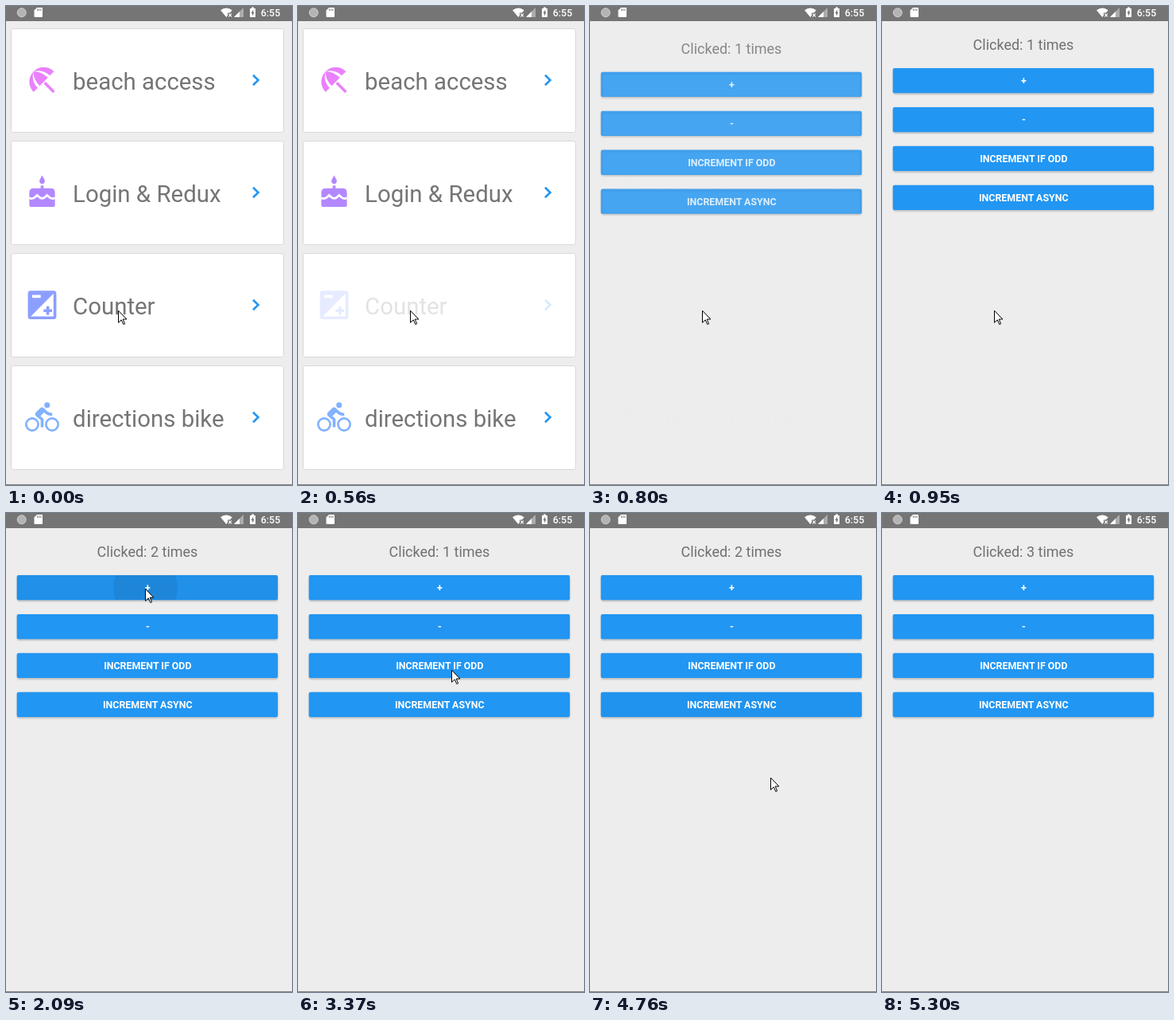
Write an HTML page that moves like this. It is 360x601 px and loops after 5.45 s.

```html
<!DOCTYPE html>
<html lang="en">
<head>
<meta charset="utf-8">
<title>Counter demo</title>
<style>
  html, body { margin: 0; height: 100%; overflow: hidden; background: #ededed; }
  svg { font-family: Roboto, sans-serif; }
  #stage { display: block; width: 100%; height: 100%; }
  .label { font-size: 29.4px; fill: #757575; }
  .line { fill: none; stroke: currentColor; stroke-width: 2; }
  .caption { font-size: 12.4px; font-weight: 700; fill: #fff; text-anchor: middle; }
  #count { font-size: 18px; fill: #707070; text-anchor: middle; }
  .shadow { fill: none; stroke: #000; stroke-opacity: .3; stroke-width: 2; filter: blur(1px); }
</style>
</head>
<body>
<svg id="stage" viewBox="0 0 360 601">
  <rect width="360" height="601" fill="#ededed"/>
  <g id="cards"></g>
  <g id="screen">
    <rect id="backdrop" y="19" width="360" height="582" fill="#ededed"/>
    <text id="count" class="fade" x="178" y="55"></text>
    <g id="buttons"></g>
    <svg id="press" x="14" width="328" height="31">
      <rect id="dim" width="328" height="31" rx="2"/>
      <circle id="ripple" cy="16" fill-opacity=".07"/>
    </svg>
    <g id="captions"></g>
  </g>
  <rect y="600" width="360" height="1" fill="#858585"/>

  <g fill="#fff">
    <rect width="360" height="19" fill="#757575"/>
    <circle cx="19.7" cy="8.3" r="5.5" fill="#b4b4b4" stroke="#d2d2d2"/>
    <path d="M39 2H45q1 0 1 1V13q0 1-1 1H36.5q-1 0-1-1V5.5Z"/>
    <path d="M39.5 3.5v2.5m2.2-2.5v2.5m2.2-2.5v2.5" stroke="#757575"/>
    <path d="M270 5.3Q277.3-.3 284.7 5.3L282 8.5H279V12L277.3 14Z"/>
    <path d="M280.3 9.7l3.6 3.6m0-3.6l-3.6 3.6" stroke="#fff" stroke-width="1.2"/>
    <path d="M287 14L299 2V14Z" opacity=".4"/>
    <path d="M287 14L294 7V14Z"/>
    <path d="M309 1.5h3V3h2v11h-7V3h2Z"/>
    <path d="M311.2 4.5L308.4 9.2H310V12.5L312.7 7.8H311.2Z" fill="#757575"/>
    <text x="320.8" y="13" font-size="12.4" font-weight="500">6:55</text>
  </g>
  <path id="cursor" d="M.5 1.2V16.3L4.2 12.8 6.8 18.5 8.6 17.7 6.2 12H10.9Z" fill="#fff" stroke="#000"/>
</svg>
<script>
const LOOP = 5450;
const $ = id => document.getElementById(id);
const set = (id, attrs) => {
  for (const name in attrs) $(id).setAttribute(name, attrs[name]);
};
const times = (n, make) => Array.from({ length: n }, (_, i) => make(i)).join('');

// Icons are drawn on a 24-unit grid.
const CARDS = [
  { label: 'beach access', color: '#ea80fc', icon: `
    <path d="M17.4 8.8l2.9-2.9c-4-4-10.4-4-14.3 0 3.9-1.3 8.3-.2 11.4 2.9zM6 6c-4 4-4 10.3 0 14.3l2.9-2.9C5.7 14.3 4.7 10 6 6zM6 6c-.4 3 1.2 6.9 4.3 10l5.7-5.7C12.9 7.2 9 5.6 6 6z"/>
    <path class="line" d="M13.8 13.8l6.5 6.5"/>` },
  { label: 'Login &amp; Redux', color: '#b388ff', icon: `
    <path d="M12 0l-1.7 3q-.8 2.4 1.7 3 2.5-.6 1.7-3zM11 7h2v2h5q3 0 3 3v9q0 1-1 1H4q-1 0-1-1v-9q0-3 3-3h5z"/>
    <path d="M2.9 15.7Q5.4 17 7.4 14.9l1.1-1.1 1.1 1.1q2.4 2.4 4.8 0l1.1-1.1 1.1 1.1Q18.6 17 21.1 15.7" fill="none" stroke="#fff" stroke-width="1.5"/>` },
  { label: 'Counter', color: '#8c9eff', icon: `
    <path fill-rule="evenodd" d="M4 2h16q2 0 2 2v16q0 2-2 2H4q-2 0-2-2V4q0-2 2-2zM5 5v2h6V5zM20 4v16H4z"/>
    <path class="line" d="M13 16h6m-3-3v6"/>` },
  { label: 'directions bike', color: '#82b1ff', icon: `
    <circle cx="15.5" cy="3.5" r="2"/>
    <g class="line"><g stroke-width="1.5"><circle cx="5" cy="17" r="4.25"/><circle cx="19" cy="17" r="4.25"/></g>
    <path d="M19.1 10Q16 10 13.9 7.6l-1.2-1.2q-.7-.7-1.4 0L8.5 9.1q-.7.7 0 1.4l3.5 3V19M10 10.5l3.2-3.2"/></g>` },
];
const BUTTONS = ['+', '-', 'INCREMENT IF ODD', 'INCREMENT ASYNC'];
const buttonTop = i => 78 + 48.9 * i;

$('cards').innerHTML = times(CARDS.length, i => {
  const { label, color, icon } = CARDS[i];
  return `<g transform="translate(0 ${28 + 141 * i})">
    <rect x="6.5" y=".5" width="343" height="130" rx="3" fill="#fff" stroke="#d8d8d8"/>
    <g id="content${i}">
      <g transform="translate(24 43.6) scale(1.79)" color="${color}" fill="${color}">${icon}</g>
      <text class="label" x="84.1" y="77">${label}</text>
      <path d="M311 58.7l6.5 6.3-6.5 6.3" fill="none" stroke="#2196f3" stroke-width="2.6"/>
    </g>
  </g>`;
});

$('buttons').innerHTML = times(BUTTONS.length, i => `
  <rect class="shadow fade" x="15" y="${buttonTop(i) + 2}" width="326" height="29.6" rx="2"/>
  <rect class="fade" x="13.7" y="${buttonTop(i)}" width="328.4" height="31.3" rx="2" fill="#2196f3"/>`);

$('captions').innerHTML = times(BUTTONS.length, i =>
  `<text class="caption fade" x="178.3" y="${buttonTop(i) + 20.3}">${BUTTONS[i]}</text>`);

const OPEN = { start: 680, end: 920, steps: 3 };
const MOVES = [
  { start: 1210, end: 1690, steps: 5, x: 175, y: 94 },
  { start: 2390, end: 2670, steps: 3, x: 164, y: 147 },
  { start: 3100, end: 3370, steps: 3, x: 193, y: 196 },
  { start: 3790, end: 4070, steps: 3, x: 202, y: 249 },
  { start: 4760, end: 5030, steps: 3, x: 298, y: 565 },
];
const PRESSES = [
  { time: 2090, button: 0, x: 175.5, radius: 40.5, add: 1, delay: 0 },
  { time: 2950, button: 1, x: 164, radius: 19, add: -1, delay: 0 },
  { time: 3640, button: 2, x: 193, radius: 0, add: 1, delay: 0 },
  { time: 4460, button: 3, x: 196, radius: 57, add: 1, delay: 840 },
];
const FADE = 500, RIPPLE = 290;

function progress({ start, end, steps }, t) {
  const step = Math.floor((t - start) / (end - start) * (steps - 1) + 1e-6) + 1;
  return Math.min(1, Math.max(0, step / steps));
}
const smooth = p => p * p * (3 - 2 * p);
const fading = document.querySelectorAll('.fade');

function drawScreen(t) {
  const p = progress(OPEN, t);
  const opacity = Math.min(1, 1.22 * p);
  set('screen', { transform: `translate(0 ${75 * (1 - p) ** 2.5})` });
  set('backdrop', { opacity: 1 - (1 - opacity) ** 2.8 });
  fading.forEach(el => el.setAttribute('opacity', opacity));
  set('content2', { opacity: t < 560 ? 1 : .2 });
}

function drawPress(t) {
  const count = PRESSES.reduce((sum, p) => sum + (t >= p.time + p.delay ? p.add : 0), 1);
  $('count').textContent = `Clicked: ${count} times`;

  const { time, button, x, radius } = PRESSES.findLast(p => p.time <= t) ?? PRESSES[0];
  const age = t - time;
  set('press', { y: buttonTop(button) });
  set('dim', { opacity: age < 0 ? 0 : .045 * Math.max(0, 1 - age / FADE) });
  set('ripple', { cx: x - 14, r: age >= 0 && age < RIPPLE ? radius : 0 });
}

function drawCursor(t) {
  let x = 141, y = 381;
  for (const move of MOVES) {
    const p = smooth(progress(move, t));
    x += (move.x - x) * p;
    y += (move.y - y) * p;
  }
  set('cursor', { transform: `translate(${Math.round(x)} ${Math.round(y)})`, opacity: t < 5180 ? 1 : 0 });
}

const start = performance.now();
function tick() {
  const t = (performance.now() - start) % LOOP;
  drawScreen(t);
  drawPress(t);
  drawCursor(t);
  requestAnimationFrame(tick);
}
tick();
</script>
</body>
</html>
```
